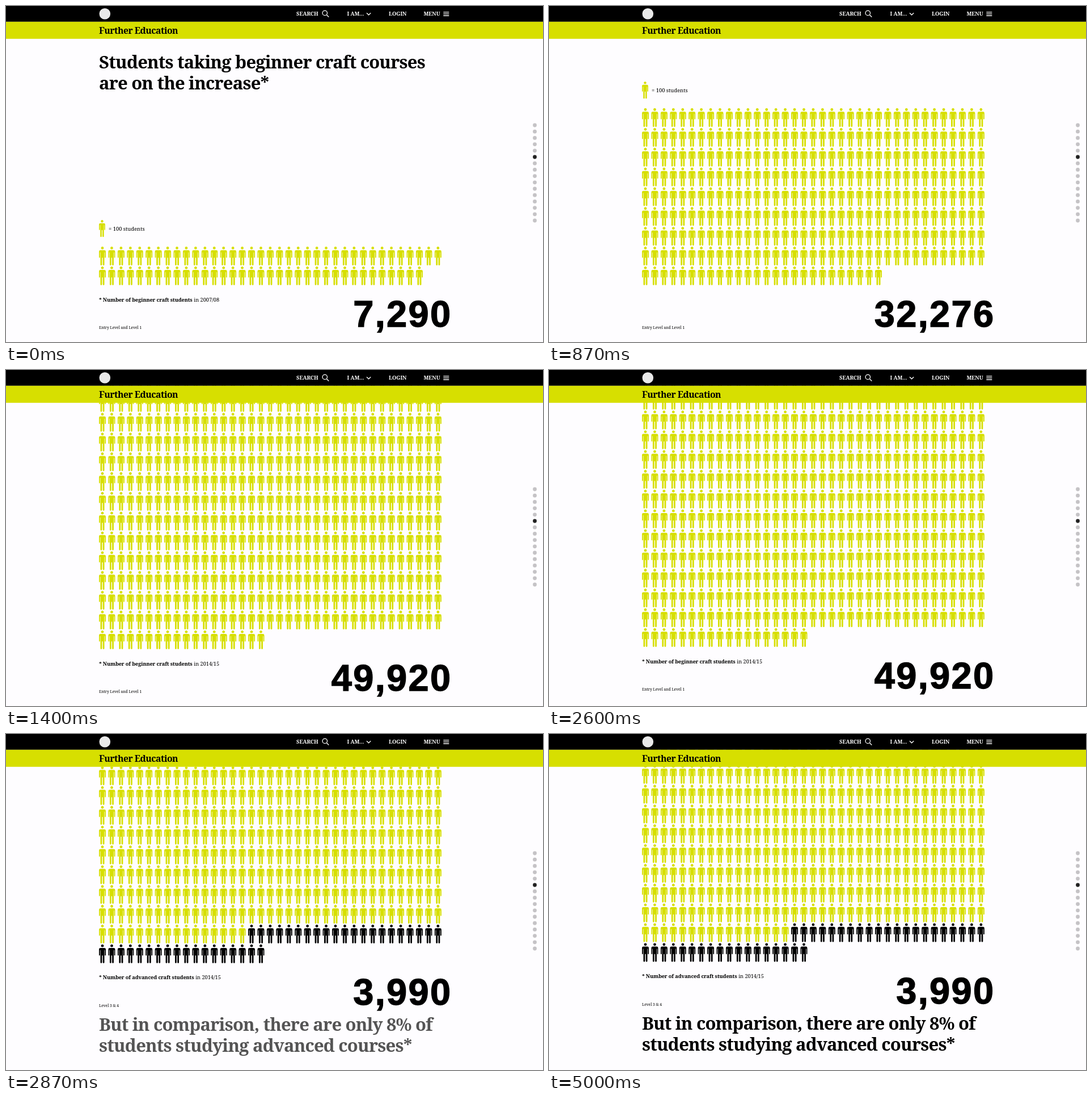
Recreate the animation shown at these times as an HTML page. Size 947 by 592 pixels, loop 5030 ms.

```html
<!DOCTYPE html>
<html lang="en">
<head>
<meta charset="utf-8">
<title>Further Education</title>
<style>
  html, body { margin: 0; width: 100%; height: 100%; overflow: hidden; background: #fefdff; }
  svg { display: block; width: 947px; height: 592px; font-family: "Noto Serif", serif; }
  .heading { font-size: 31px; font-weight: 700; letter-spacing: -.027em; }
  .section { font-size: 15.8px; font-weight: 700; letter-spacing: -.033em; }
  .nav { font-size: 9.4px; font-weight: 700; letter-spacing: -.01em; fill: #fff; }
  .legend { font-size: 9.4px; }
  .note { font-size: 9.2px; }
  .note .strong { font-weight: 700; letter-spacing: -.012em; }
  .level { font-size: 6.7px; }
  .total { font: 700 65px "Liberation Sans", Arial, sans-serif; letter-spacing: 2.3px; text-anchor: end; stroke: #000; stroke-width: 1.3; }
  .icon { fill: none; stroke: #fff; stroke-width: 1.3; }
</style>
</head>
<body>
<svg viewBox="0 0 947 592">
  <defs>
    <g id="person">
      <circle cx="6" cy="2.5" r="2.4"/>
      <path d="M2.4 6.3h7.2Q12 6.3 12 8.7V18.7a.9.9 0 0 1-1.8 0V10.2h-.7V31.7a1.35 1.35 0 0 1-2.8 0V19.5h-1.4V31.7a1.35 1.35 0 0 1-2.8 0V10.2h-.7v8.5a.9.9 0 0 1-1.8 0V8.7Q0 6.3 2.4 6.3Z"/>
    </g>
  </defs>

  <g id="page">
    <g id="intro">
      <text class="heading" x="164" y="110">Students taking beginner craft courses</text>
      <text class="heading" x="164" y="147">are on the increase*</text>
      <use href="#person" fill="#d7df00" transform="translate(164 377) scale(.91)"/>
      <text class="legend" x="181" y="396">= 100 students</text>
    </g>
    <g id="crowd"></g>
    <text class="note" id="note" x="164" y="520.5"><tspan class="strong" id="subject"></tspan><tspan id="year" dx="2.6"></tspan></text>
    <text class="level" id="level" x="164" y="569"></text>
    <text class="total" id="total" x="786.4" y="565.3"></text>
    <g id="outro">
      <text class="heading" x="164" y="611.5">But in comparison, there are only 8% of</text>
      <text class="heading" x="164" y="648.5">students studying advanced courses*</text>
    </g>
  </g>

  <rect width="947" height="27.8"/>
  <rect y="27.8" width="947" height="30" fill="#d7df00"/>
  <circle cx="174.3" cy="13.8" r="9.8" fill="#e9e9e9"/>
  <text class="section" x="164" y="48.7">Further Education</text>
  <g class="nav">
    <text x="512" y="17.3">SEARCH</text>
    <text x="601.5" y="17.3">I AM...</text>
    <text x="675" y="17.3">LOGIN</text>
    <text x="736.5" y="17.3">MENU</text>
  </g>
  <g class="icon">
    <circle cx="562.3" cy="12.4" r="4.2"/>
    <path d="M565.3 15.5L569.3 19.5M636 12.3L639.6 15.8L643.2 12.3M771.3 10.8h10M771.3 13.9h10M771.3 17h10"/>
  </g>
  <g id="dots"></g>
</svg>

<script>
const LOOP = 5030, TICK = 100 / 3;
const COLUMNS = 37, COLUMN_STEP = 16.44, ROW_STEP = 34.85;
const FIRST_TOTAL = 7290, LAST_TOTAL = 49920, ADVANCED_TOTAL = 3990;
const LIME = "#d7df00", BLACK = "#000";
const SCROLL_START = 78, SWITCH = 83, FADE = 6;

const $ = id => document.getElementById(id);
const people = [];

function add(parent, tag, attributes) {
  const node = document.createElementNS("http://www.w3.org/2000/svg", tag);
  for (const name in attributes) node.setAttribute(name, attributes[name]);
  return parent.appendChild(node);
}

const hundreds = total => Math.floor(total / 100);
const shift = (node, y) => node.setAttribute("transform", `translate(0 ${y.toFixed(2)})`);

function setText(node, text) {
  if (node.textContent !== text) node.textContent = text;
}

// Students counted at a given tick: ease in, steady run, ease out.
function countAt(tick) {
  if (tick <= 13) return FIRST_TOTAL;
  if (tick <= 19) return Math.round(FIRST_TOTAL + 8176 * ((tick - 13) / 6) ** 1.5);
  if (tick <= 30) return Math.round(15466 + 26416 * (tick - 19) / 11);
  if (tick < 42) return Math.round(LAST_TOTAL - 8038 * ((42 - tick) / 12) ** 3);
  return LAST_TOTAL;
}

function scrollAt(tick) {
  if (tick < SCROLL_START) return 0;
  return tick >= 93 ? 90.5 : 90.5 - 86.5 * Math.exp(-.449 * (tick - SCROLL_START));
}

function render(time) {
  const tick = Math.floor((time % LOOP + 4) / TICK);
  const count = countAt(tick);
  const shown = hundreds(count);
  const rows = Math.ceil(shown / COLUMNS);
  const advanced = tick >= SWITCH;
  const firstBlack = advanced ? shown - hundreds(ADVANCED_TOTAL) : shown;

  people.forEach((person, i) => {
    person.setAttribute("display", i < shown ? "inline" : "none");
    person.setAttribute("fill", i < firstBlack ? LIME : BLACK);
  });

  shift($("page"), -scrollAt(tick));
  shift($("crowd"), 458.8 - (rows - 1) * ROW_STEP);
  shift($("intro"), (2 - rows) * ROW_STEP);

  const counting = count > FIRST_TOTAL && count < LAST_TOTAL;
  $("note").setAttribute("display", counting ? "none" : "inline");
  setText($("subject"), `* Number of ${advanced ? "advanced" : "beginner"} craft students`);
  setText($("year"), count < LAST_TOTAL ? "in 2007/08" : "in 2014/15");
  setText($("level"), advanced ? "Level 3 & 4" : "Entry Level and Level 1");
  setText($("total"), (advanced ? ADVANCED_TOTAL : count).toLocaleString("en-US"));
  $("outro").setAttribute("opacity", Math.max(0, Math.min(1, (tick - SWITCH + 1) / FADE)));
}

for (let i = 0; i < hundreds(LAST_TOTAL); i++) {
  people.push(add($("crowd"), "use", {
    href: "#person",
    x: 164 + i % COLUMNS * COLUMN_STEP,
    y: Math.floor(i / COLUMNS) * ROW_STEP
  }));
}
for (let i = 0; i < 16; i++) {
  add($("dots"), "circle", { cx: 932.5, cy: 210 + i * 11.2, r: 3.4, fill: i === 5 ? "#222" : "#c5c3c6" });
}

const start = performance.now();
function loop() {
  render(performance.now() - start);
  requestAnimationFrame(loop);
}
loop();
</script>
</body>
</html>
```
